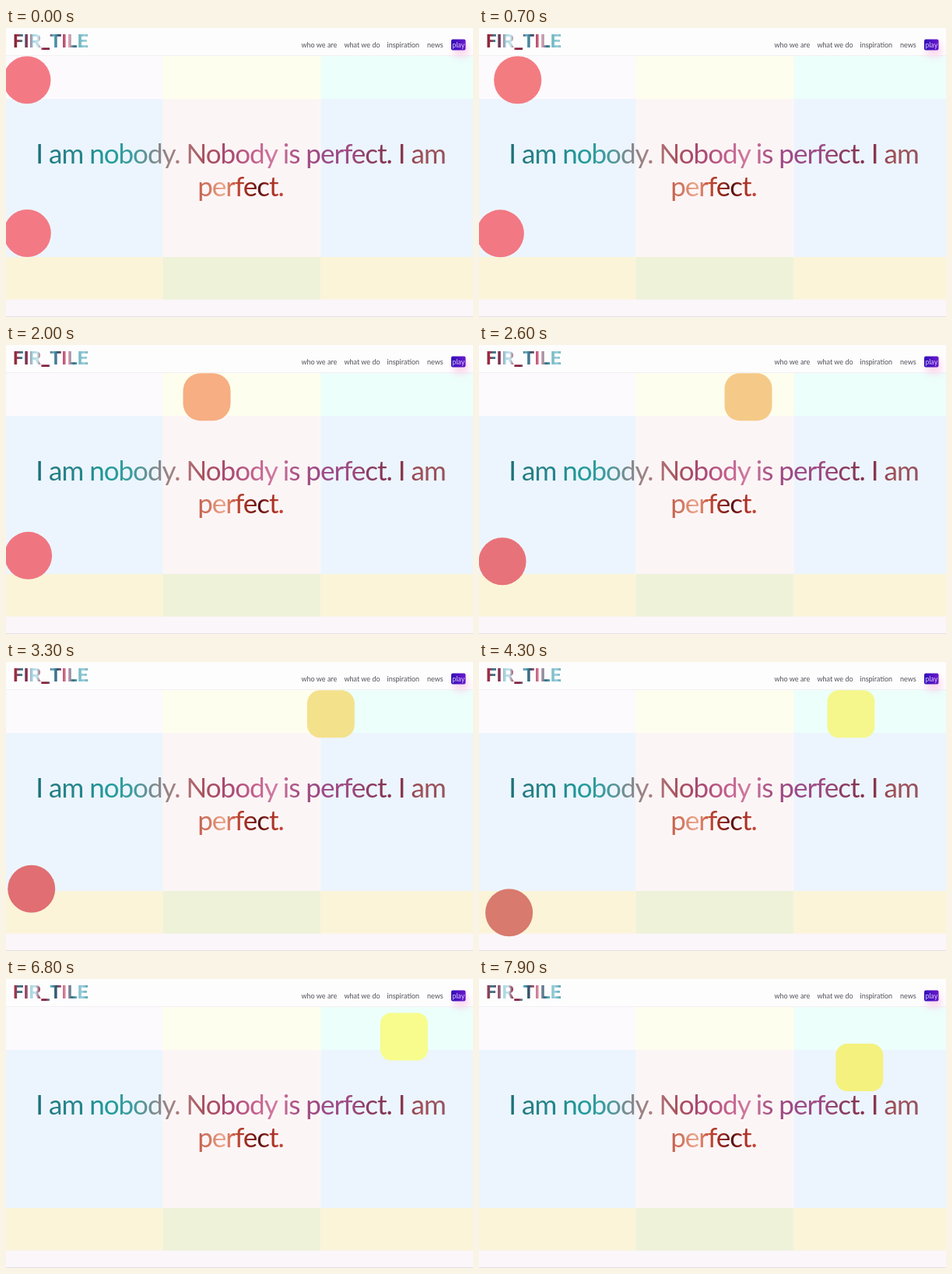
These frames come from a looping animation (600 by 371 pixels, 8 s). An HTML page:

```html
<!DOCTYPE html>
<html lang="en">
<head>
<meta charset="utf-8">
<title>I am perfect</title>
<style>
  html, body { margin: 0; width: 100%; height: 100%; overflow: hidden; background: #fff; }
  svg { display: block; width: 600px; height: 371px; }
  text { font-family: Lato, "Open Sans", sans-serif; }
  .headline { font-size: 35px; letter-spacing: -1px; text-anchor: middle; }
  .nav { font-size: 9px; fill: #505058; }
  .brand { font: 700 24.5px Roboto, "Liberation Sans", sans-serif; }
</style>
</head>
<body>
<svg viewBox="0 0 600 371">
  <defs id="defs">
    <linearGradient id="button">
      <stop offset="0" stop-color="#3010b8"/>
      <stop offset="1" stop-color="#6c18cc"/>
    </linearGradient>
    <filter id="soft" x="-100%" y="-100%" width="300%" height="300%">
      <feGaussianBlur stdDeviation="4"/>
    </filter>
  </defs>
  <rect width="600" height="371" fill="#fbf6f9"/>
  <g id="tiles"></g>
  <rect width="600" height="36" fill="#fefdfe"/>
  <rect y="35" width="600" height="1" fill="#f2eff2"/>
  <rect y="370" width="600" height="1" fill="#e3dfe2"/>

  <text class="brand" x="9" y="25" fill="url(#brandFill)">FIR_TILE</text>
  <g id="nav" class="nav"></g>
  <rect x="575" y="20" width="19" height="17" fill="#f9c4e4" opacity=".6" filter="url(#soft)"/>
  <rect x="572" y="14.4" width="18.5" height="14.2" rx="2" fill="url(#button)"/>
  <text class="nav" x="581.3" y="25" text-anchor="middle" style="fill:#dcc4f6">play</text>

  <text class="headline" x="301.5" y="174" fill="url(#lineOneFill)">I am nobody. Nobody is perfect. I am</text>
  <text class="headline" x="301.5" y="216" fill="url(#lineTwoFill)">perfect.</text>

  <rect id="slider" width="61" height="61"/>
  <circle id="faller" r="30.5"/>
</svg>
<script>
const LOOP = 8000, STEP = 100;
const $ = id => document.getElementById(id);

function add(parent, tag, attrs, text = '') {
  const el = document.createElementNS('http://www.w3.org/2000/svg', tag);
  set(el, attrs);
  el.textContent = text;
  parent.append(el);
  return el;
}

function set(el, attrs) {
  for (const key in attrs) el.setAttribute(key, attrs[key]);
}

// Evenly spaced colours from x1 to x2, in stage coordinates.
function gradient(id, x1, x2, colors) {
  const g = add($('defs'), 'linearGradient',
    { id, x1, x2, y1: 0, y2: 0, gradientUnits: 'userSpaceOnUse' });
  colors.split(' ').forEach((color, i, all) =>
    add(g, 'stop', { offset: i / (all.length - 1), 'stop-color': color }));
  return g;
}

const columns = [0, 201.5, 404.5, 600];
const rows = [
  [36, 91, ['#fdfafd', '#fefeee', '#ecfffb']],
  [91, 294, ['#ecf5fd', '#fcf5f6', '#ecf5fd']],
  [294, 348.5, ['#fbf4d9', '#eef2d9', '#fbf4d9']]
];
for (const [top, bottom, fills] of rows)
  fills.forEach((fill, i) => add($('tiles'), 'rect', {
    x: columns[i], y: top, width: columns[i + 1] - columns[i], height: bottom - top, fill
  }));

const links = [[379.5, 'who we are'], [434.5, 'what we do'], [489.5, 'inspiration'], [541, 'news']];
for (const [x, label] of links) add($('nav'), 'text', { x, y: 25 }, label);

gradient('lineOneFill', 41, 563,
  '#1c7078 #28828a #22888c #219c9c #3f9c9f #85888c #b07c7c #a8505c #a84872 ' +
  '#c2608c #d07ca0 #a04a80 #9c4a88 #a04c84 #8a3a60 #80304a #a05058 #96525f');
gradient('lineTwoFill', 247, 357,
  '#c4604e #d47b62 #eba88e #c85038 #9c2a1e #5a1010 #a83024 #c84a3a');
const brandFill = gradient('brandFill', 8, 108,
  '#50202c #a82c44 #2c8494 #8c2444 #a4d4e0 #c4e4ec #8c1c38 #7c2040 ' +
  '#5cb4c8 #305068 #c05070 #e0a4b4 #2c6c80 #70b8c4 #a0d0dc #58a4b4');

const lerp = (a, b, k) => a + (b - a) * k;

// Colour at position p along a list of [position, r, g, b].
function colorAt(stops, p) {
  const i = Math.max(1, stops.findIndex(s => s[0] >= p));
  const [a, b] = [stops[i - 1], stops[i]];
  const k = (p - a[0]) / (b[0] - a[0]);
  return `rgb(${[1, 2, 3].map(c => Math.round(lerp(a[c], b[c], k)))})`;
}

// cubic-bezier(.25, .1, .25, 1)
function ease(x) {
  if (x <= 0) return 0;
  if (x >= 1) return 1;
  const curve = (u, a, b) => 3 * u * (1 - u) ** 2 * a + 3 * u * u * (1 - u) * b + u ** 3;
  let low = 0, high = 1;
  for (let i = 0; i < 24; i++) {
    const mid = (low + high) / 2;
    if (curve(mid, .25, .25) < x) low = mid; else high = mid;
  }
  return curve(low, .1, 1);
}

const sliderColors = [
  [0, 243, 122, 132], [.21, 241, 131, 120], [.47, 246, 174, 130],
  [.8, 244, 225, 140], [.93, 245, 248, 140], [1, 247, 254, 144], [2, 240, 224, 104]
];
const fallerColors = [
  [0, 243, 121, 132], [2, 239, 118, 128], [3.3, 224, 110, 114],
  [4.3, 216, 122, 110], [5.6, 184, 141, 121], [8, 130, 170, 140]
];

function draw(t) {
  const across = ease((t - .32) / 6);
  const back = ease((t - 6.32) / 6);
  set($('slider'), {
    x: lerp(-3.5, 485, across) - 61 * back,
    y: 36.3 + 107 * back,
    rx: 61 * (lerp(.5, .22, across) + .06 * back),
    fill: colorAt(sliderColors, across + back)
  });

  const fall = 122 * (t / 5.6) ** 2.8;
  set($('faller'), {
    cx: 27.3 + fall * .195,
    cy: 263.5 + fall,
    fill: colorAt(fallerColors, t)
  });

  set(brandFill, { gradientTransform: `translate(${-.5 * t} 0)` });
}

function frame(now) {
  draw(Math.floor(now % LOOP / STEP) * STEP / 1000);
  requestAnimationFrame(frame);
}
draw(0);
requestAnimationFrame(frame);
</script>
</body>
</html>
```
